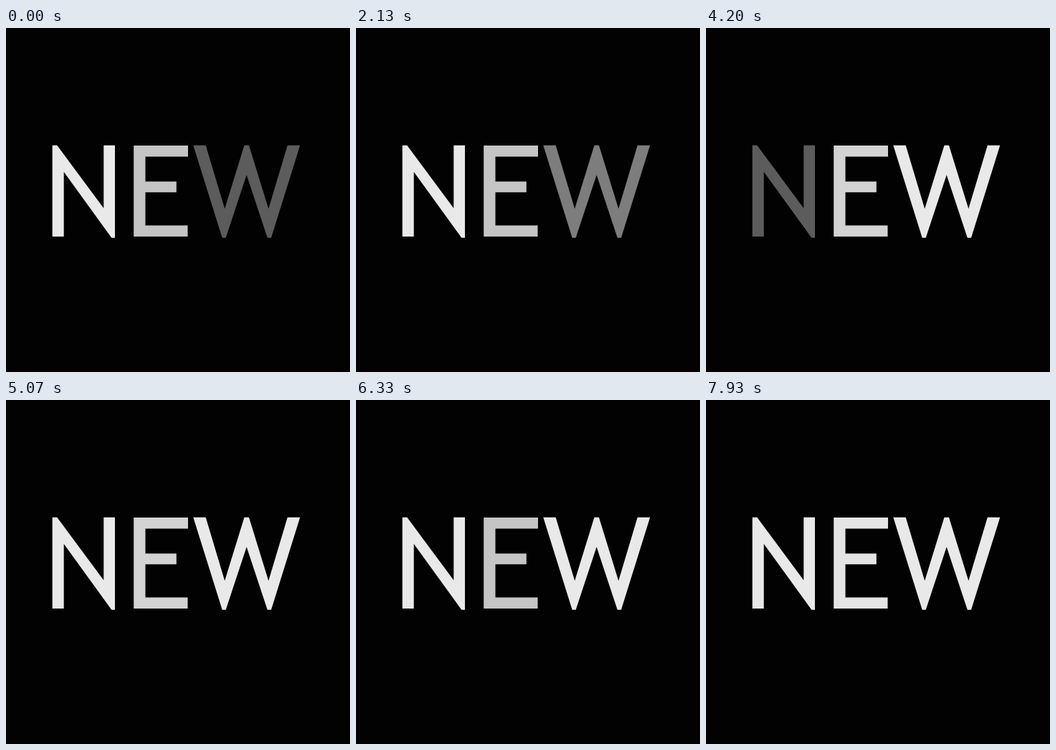
Write an HTML page that moves like this. It is 480x480 px and loops after 8000 ms.

```html
<!DOCTYPE html>
<html lang="en">
<head>
<meta charset="utf-8">
<title>NEW</title>
<style>
  html, body { margin: 0; height: 100%; overflow: hidden; background: #020202; }
  svg { display: block; width: 100vw; height: 100vh; }
</style>
</head>
<body>
<svg viewBox="0 0 480 480" role="img" aria-label="NEW">
  <rect y="477" width="480" height="3" fill="#060003"/>
  <path id="n" d="M64.7 163.7H71.3L136.3 251.5V163.7H152V292.7H147.3L80.7 200.7V291H64.7Z"/>
  <path id="e" d="M178.2 164H254V179.4H194.5V214.2H237.8V229.2H194.5V275.6H253.5V291H178.2Z"/>
  <path id="w" d="M261.3 163.7H278.7L305.2 252.3L332.5 163.7H339L366.3 252.3L392.8 163.7H410.3L370 292.7H364.8L335.7 205L306.7 292.7H301.7Z"/>
</svg>
<script>
const LOOP = 8000, FULL = 233, DIM = 92, SOFT = 197;

// Grey level keys [time, level]; levels are linear between keys, equal times are hard cuts.
const cut = (start, end, level, rest) =>
  [[start, rest], [start, level], [end, level], [end, rest]];

const tracks = {
  n: [
    [0, FULL], [2930, FULL], [3000, DIM], [3035, DIM], [3100, FULL],
    ...cut(4200, 4270, DIM, FULL)
  ],
  e: [
    [0, SOFT], [600, SOFT], [830, 150], [1000, 150], [1230, SOFT],
    [2440, SOFT], [2570, 165], [2700, SOFT],
    ...cut(3800, 3970, 150, SOFT),
    [4200, SOFT], [4200, 211],
    ...cut(4470, 4530, 150, 211),
    ...cut(4700, 4730, 150, 211),
    ...cut(4870, 5070, 150, 211),
    [5200, SOFT], [5540, SOFT], [5700, 73], [6170, 73],
    [6170, 150], [6330, SOFT], [6470, SOFT], [6600, 228]
  ],
  w: [
    [0, DIM], [40, DIM], [400, FULL],
    [1430, FULL], [1800, DIM], [2070, DIM], [2330, FULL],
    ...cut(3270, 3470, 150, FULL)
  ]
};

function levelAt(keys, time) {
  const next = keys.findIndex(([t]) => t > time);
  if (next < 0) return keys.at(-1)[1];
  const [t0, a] = keys[next - 1], [t1, b] = keys[next];
  return a + (b - a) * (time - t0) / (t1 - t0);
}

function draw() {
  const time = performance.now() % LOOP;
  for (const id in tracks) {
    const grey = Math.round(levelAt(tracks[id], time));
    document.getElementById(id).setAttribute("fill", `rgb(${grey},${grey},${grey})`);
  }
  requestAnimationFrame(draw);
}
draw();
</script>
</body>
</html>
```
